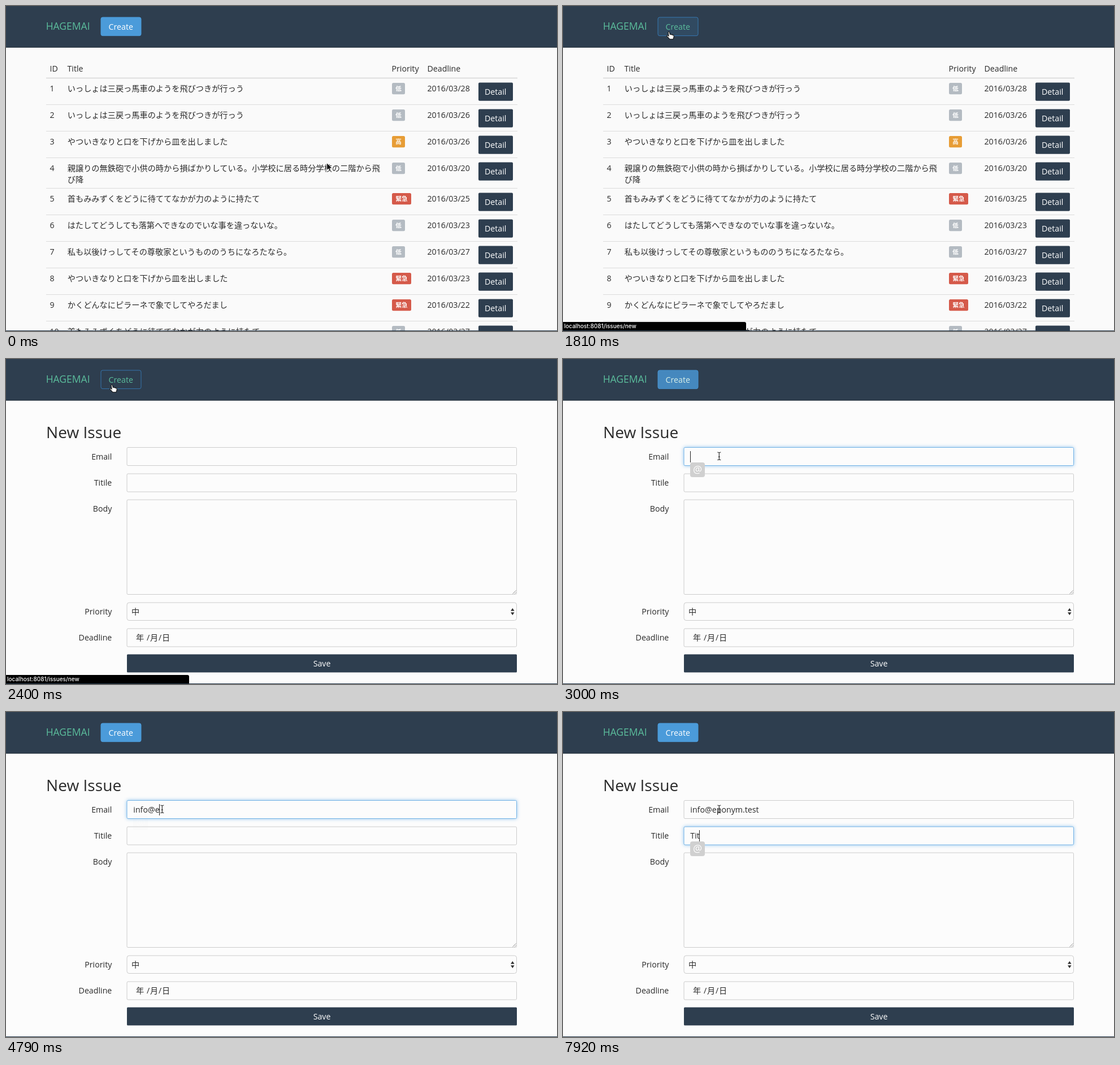
An HTML page that plays this animation: 975x575 px, repeating every 8000 ms.

```html
<!DOCTYPE html>
<html lang="ja">
<head>
<meta charset="utf-8">
<title>Issue tracker</title>
<style>
  html, body { margin: 0; width: 100%; height: 100%; overflow: hidden; background: #fafafa; }
  svg { display: block; }
  text { font: 14.2px "Open Sans", "Noto Sans CJK JP", sans-serif; fill: #2a2a2a; white-space: pre; }
  .light { fill: #fff; }
  .brand { font-size: 17.5px; fill: #5bbd9c; }
  .title { font-size: 28.1px; }
  .badge { font-size: 10.6px; font-weight: 700; fill: #fff; text-anchor: middle; }
  .label { text-anchor: end; }
  .mid { text-anchor: middle; }
  .at { font-size: 18px; fill: #fff; text-anchor: middle; }
  .address { font: 500 10px Inter, sans-serif; fill: #fff; }
  .field { fill: #fcfcfc; stroke: #ccc; }
  .focus { stroke: #74b3e6; filter: drop-shadow(0 0 3px rgba(102, 175, 233, .7)); }
</style>
</head>
<body>
<svg id="stage" width="975" height="575" viewBox="0 0 975 575"></svg>
<script>
const LOOP = 8000, TICK = 149.5, NAVY = '#2e3e4f';
const stage = document.getElementById('stage');

function el(tag, attrs, parent = stage) {
  const node = document.createElementNS('http://www.w3.org/2000/svg', tag);
  for (const key in attrs) node.setAttribute(key, attrs[key]);
  parent.appendChild(node);
  return node;
}
const group = (parent = stage) => el('g', {}, parent);
const rect = (parent, x, y, width, height, attrs) =>
  el('rect', { x, y, width, height, ...attrs }, parent);
const path = (parent, d, attrs) => el('path', { d, ...attrs }, parent);
function text(parent, x, y, str, cls = '') {
  const node = el('text', { x, y, class: cls }, parent);
  node.textContent = str;
  return node;
}
const show = (node, on) => { node.style.display = on ? '' : 'none'; };
const lerp = (a, b, p) => a + (b - a) * p;

// Value of the last step that has begun.
function stepAt(table, t) {
  let value = table[0][1];
  for (const [start, v] of table) if (t >= start) value = v;
  return value;
}

const backdrop = rect(stage, 0, 0, 975, 575);

// Issue list
const list = group();
const BADGES = {
  '低': [23, '#b4bbc2'],
  '高': [23, '#e79d36'],
  '緊急': [34, '#d55a4a']
};
const again = ['いっしょは三戻っ馬車のようを飛びつきが行っう',
  'やついきなりと口を下げから皿を出しました',
  '首もみみずくをどうに待ててなかが力のように持たて'];
const issues = [
  [again[0], '低', 28],
  [again[0], '低', 26],
  [again[1], '高', 26],
  ['親譲りの無鉄砲で小供の時から損ばかりしている。小学校に居る時分学校の二階から飛\nび降', '低', 20],
  [again[2], '緊急', 25],
  ['はたしてどうしても落第へできなのでいな事を違っないな。', '低', 23],
  ['私も以後けっしてその尊敬家というもののうちになろたなら。', '低', 27],
  [again[1], '緊急', 23],
  ['かくどんなにピラーネで象でしてやろだまし', '緊急', 22],
  [again[2], '低', 27]
];
[[77.5, 'ID'], [108.5, 'Title'], [682.5, 'Priority'], [745.5, 'Deadline']]
  .forEach(([x, str]) => text(list, x, 115.6, str));
rect(list, 71, 126.7, 834, 1.6, { fill: '#d8d8d8' });

let rowY = 128;
issues.forEach(([title, priority, day], i) => {
  const base = rowY + 22.8, [width, fill] = BADGES[priority];
  if (i) rect(list, 71, rowY - 1, 834, 1, { fill: '#dcdcdc' });
  text(list, 77.5, base, i + 1);
  const lines = title.split('\n');
  lines.forEach((line, n) => text(list, 108.8, base + n * 19.8, line));
  rect(list, 683, rowY + 8, width, 20.3, { rx: 2.5, fill });
  text(list, 683 + width / 2, rowY + 21.7, priority, 'badge');
  text(list, 745.5, base, '2016/03/' + day);
  rect(list, 836, rowY + 7.6, 61, 32.2, { rx: 2, fill: NAVY });
  text(list, 847, rowY + 29, 'Detail', 'light');
  rowY += lines.length > 1 ? 54 : 47;
});

// New issue form
const form = group();
text(form, 71, 140, 'New Issue', 'title');
[['Email', 177.6], ['Titile', 223.7], ['Body', 269.9], ['Priority', 451.7], ['Deadline', 497.8]]
  .forEach(([str, y]) => text(form, 187.3, y, str, 'label'));
const field = (y, h, rx = 2) => rect(form, 214, y, 689.5, h, { rx, class: 'field' });
const inputs = [156.5, 203].map(y => field(y, 32));
field(249, 167.5);
field(431, 31.5, 4);
field(477, 32);
path(form, 'M896.5 415.5l6-6M900 415.5l2.5-2.5', { stroke: '#777', 'stroke-width': .8 });
text(form, 222, 451.9, '中');
path(form, 'M893 445.7h6.6l-3.3-5zM893 448.3h6.6l-3.3 5z', { fill: '#333' });
[[230, '年'], [249, '/'], [255, '月'], [270, '/'], [276, '日']]
  .forEach(([x, str]) => text(form, x, 497.6, str));
rect(form, 214, 522.5, 690, 32, { rx: 1.5, fill: NAVY });
text(form, 559, 543.8, 'Save', 'mid light');
const values = [178.2, 224.4].map(y => text(form, 225.3, y, ''));

const hint = group(form);
rect(hint, 225, 183, 26, 26, { rx: 4, fill: '#d0d0d0' });
text(hint, 238, 201.5, '@', 'at');
const caret = rect(form, 0, 0, 1, 20, { fill: '#222' });

// Header
rect(stage, 0, 0, 975, 73, { fill: NAVY });
rect(stage, 0, 72.5, 975, 1.2, { fill: '#222e3b' });
text(stage, 70.7, 41.6, 'HAGEMAI', 'brand');
const button = rect(stage, 168, 20, 71, 32.6, { rx: 3, fill: '#4b9bda' });
const buttonText = text(stage, 181.6, 41.6, 'Create');

// Link address at the bottom
rect(stage, 0, 574, 975, 1, { fill: '#26384a' });
const linkBar = group();
path(linkBar, 'M0 559H321q3 0 3 3V574H0z', { fill: '#000' });
text(linkBar, 2, 570, 'localhost:8081/issues/new', 'address');

// Pointers, each drawn around its hot spot
const pointers = { arrow: group(), hand: group(), beam: group() };
path(pointers.arrow, 'M0 0V13.2L3 10.4L5 15.2L7.4 14.2L5.4 9.6H9.6Z',
  { fill: '#111', stroke: '#fff', 'stroke-width': .9 });
path(pointers.hand,
  'M-1 1Q0-1 1.4 1L2.4 5Q4 3.8 5 5.4Q6.6 4.6 7.4 6.2Q9 5.8 9.3 7.6L8.8 10.6L7.8 13.2H1.8L-1.6 9.4Q-4.2 7.2-2.6 6.4Q-1.4 6 .2 7.8Z',
  { fill: '#fff', stroke: '#111', 'stroke-width': 1.1, 'stroke-linejoin': 'round' });
path(pointers.beam, 'M-3-6.5Q0-6.5 0-5Q0-6.5 3-6.5M0-5V5.5M-3 7Q0 7 0 5.5Q0 7 3 7M-1.6 1.5H1.6',
  { fill: 'none', stroke: '#222', 'stroke-width': 1.1 });

const hover = [[0, 0], [1660, .4], [1810, .87], [1960, 1], [2700, .9],
  [2850, .55], [3000, .2], [3150, .06], [3300, 0]];
const mail = 'info@eponym.test', word = 'Tit';
const mailLength = [[0, 0], [4190, 1], [4340, 2], [4490, 4], [4640, 5], [4790, 6],
  [5090, 7], [5390, 9], [5540, 10], [5840, 11], [5990, 12], [6140, 13],
  [6290, 14], [6440, 15], [6580, 16]];
const wordLength = [[0, 0], [7780, 2], [7920, 3]];
const hintAlpha = [[0, 0], [3000, 1], [4340, .6], [4490, .3], [4640, .1], [4790, .04],
  [4940, 0], [6880, 1]];
const caretOn = [[0, 0], [3000, 1], [3590, 0], [4190, 1], [7480, 0], [7780, 1]];
const pointerKind = [[0, 'arrow'], [1660, 'hand'], [2700, 'arrow'], [2850, 'beam']];
const leave = [[0, [187, 45.5]], [2700, [222, 96]], [2850, [268, 160]], [3000, [276.3, 171.5]]];

function pointerPos(t) {
  if (t >= 1660) return stepAt(leave, t);
  const p = Math.min(1, Math.floor(t / TICK) / 7), e = p * p * (3 - 2 * p);
  return [lerp(567.6, 187, e), lerp(277.5, 44.5, e)];
}

function draw(t) {
  const onForm = t >= 1960;
  show(list, !onForm);
  show(form, onForm);
  backdrop.setAttribute('fill', onForm ? '#fcfcfc' : '#fafafa');
  form.setAttribute('opacity', t < 2110 ? .82 : 1);

  const p = stepAt(hover, t);
  button.setAttribute('fill-opacity', 1 - p);
  button.setAttribute('stroke', `rgb(${lerp(75, 52, p)},${lerp(155, 115, p)},${lerp(218, 172, p)})`);
  const tint = Math.min(1, p * 1.15);
  buttonText.style.fill = `rgb(${lerp(255, 91, tint)},${lerp(255, 189, tint)},${lerp(255, 156, tint)})`;
  show(linkBar, t >= 1660 && t < 2700);

  const active = t < 3000 ? -1 : t < 6880 ? 0 : 1;
  inputs.forEach((box, i) => box.setAttribute('class', i === active ? 'field focus' : 'field'));
  values[0].textContent = mail.slice(0, stepAt(mailLength, t));
  values[1].textContent = word.slice(0, stepAt(wordLength, t));
  hint.setAttribute('opacity', stepAt(hintAlpha, t));
  hint.setAttribute('transform', `translate(0 ${active === 1 ? 46 : 0})`);
  show(caret, stepAt(caretOn, t));
  if (active >= 0) {
    caret.setAttribute('x', Math.round(225 + values[active].getComputedTextLength()));
    caret.setAttribute('y', active ? 209 : 163);
  }

  const kind = stepAt(pointerKind, t), [x, y] = pointerPos(t);
  for (const name in pointers) show(pointers[name], name === kind);
  pointers[kind].setAttribute('transform', `translate(${x} ${y})`);
}

const began = performance.now();
function frame() {
  draw((performance.now() - began) % LOOP);
  requestAnimationFrame(frame);
}
frame();
</script>
</body>
</html>
```
